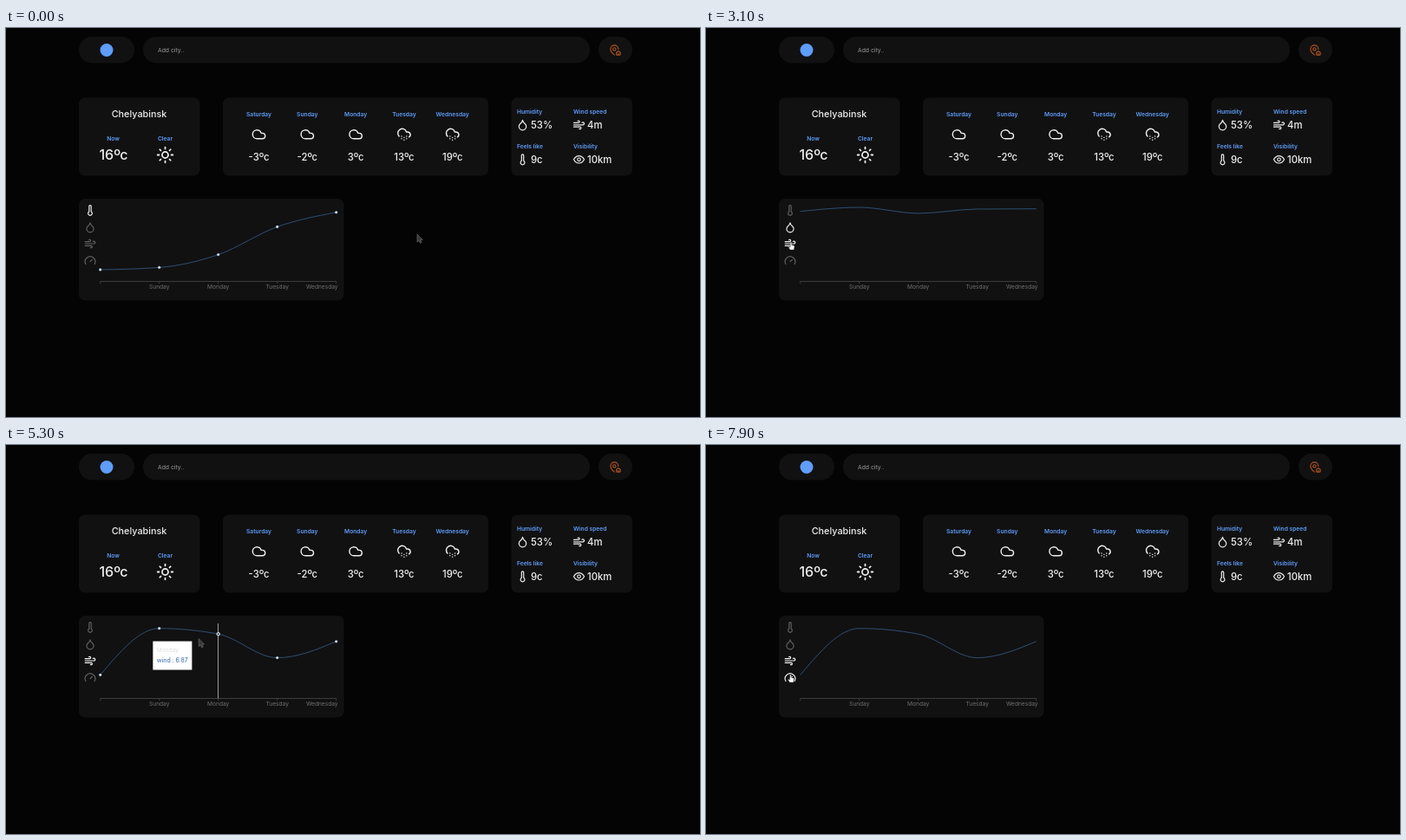
Animation, 800 px wide and 449 px high, one loop 8 s. Source, as an HTML page:

```html
<!DOCTYPE html>
<html lang="en">
<head>
<meta charset="utf-8">
<title>Weather dashboard</title>
<style>
  html, body { margin: 0; width: 100%; height: 100%; overflow: hidden; background: #040404; }
  svg { display: block; width: 800px; height: 449px; font-family: Inter, "Open Sans", sans-serif; }
  .card { fill: #111112; }
  .label { fill: #609df8; font-size: 6.7px; font-weight: 600; }
  .value { fill: #f0f0f0; font-size: 11.3px; font-weight: 500; }
  .mid { text-anchor: middle; }
  .icon { fill: none; stroke: #f0f0f0; stroke-width: 2; stroke-linecap: round; stroke-linejoin: round; }
  .axis { fill: none; stroke: #505050; stroke-width: .7; }
  .tick { fill: #707070; font-size: 6.6px; }
  .dot { fill: #fff; stroke: #5b9ad8; stroke-width: .3; }
</style>
</head>
<body>
<svg id="stage" viewBox="0 0 800 449">
  <g class="card">
    <rect x="84" y="10" width="64" height="30.5" rx="15"/>
    <rect x="158" y="10" width="515" height="30.5" rx="15"/>
    <rect x="683" y="10" width="39" height="30.5" rx="15"/>
    <rect x="84" y="80.5" width="139.5" height="90" rx="7"/>
    <rect x="250" y="80.5" width="306" height="90" rx="7"/>
    <rect x="582.5" y="80.5" width="139.5" height="90" rx="7"/>
    <rect x="84" y="197" width="305.5" height="117.5" rx="7"/>
  </g>
  <circle cx="116" cy="25.5" r="7.5" fill="#5f9df7"/>
  <text x="175" y="27.8" fill="#9a9a9a" font-size="6.8">Add city..</text>
  <g id="static"></g>
  <g id="tabs"></g>
  <path id="axis" class="axis"/>
  <g id="ticks"></g>
  <path id="curve" fill="none" stroke="#4378ae" stroke-width=".6"/>
  <g id="dots"></g>
  <g id="hover">
    <path id="rule" stroke="#9c9c9c" stroke-width="1"/>
    <circle id="active" r="1.7" fill="#27435f" stroke="#fff" stroke-width="1"/>
    <g id="tip">
      <rect width="45" height="33" fill="#fff"/>
      <text id="tipDay" x="4.5" y="12" font-size="6.6" fill="#dedede"></text>
      <text id="tipValue" x="4.5" y="24" font-size="6.9" font-weight="500" fill="#4b7db5"></text>
    </g>
  </g>
  <path id="arrow" d="M0 0V9L2 7.4 3.4 10.3 5 9.5 3.6 6.6H6.2Z" fill="#383838" stroke="#777" stroke-width=".6"/>
  <path id="hand" d="M-.8 .6Q0 -.6 .8 .6V3.4L3.3 4Q4.1 4.3 4 5.3L3.4 9H-1.2L-3 5.7Q-2.6 4.7 -.8 6Z" fill="#fff" stroke="#222" stroke-width=".4"/>
</svg>
<script>
const $ = id => document.getElementById(id);
const LOOP = 8000;
const DAYS = ["Saturday", "Sunday", "Monday", "Tuesday", "Wednesday"];
const LEFT = 108.7, STEP = 68;
const NODES = DAYS.map((_, i) => LEFT + i * STEP);
const TAB_Y = [210.5, 230, 249, 268.5];

const ICONS = {
  cloud: "M17.5 19H9a7 7 0 1 1 6.71-9h1.79a4.5 4.5 0 1 1 0 9Z",
  snow: "M4 14.9A7 7 0 1 1 15.71 8h1.79a4.5 4.5 0 0 1 2.5 8.24M8 15h.01M8 19h.01M12 17h.01M12 21h.01M16 15h.01M16 19h.01",
  sun: "M8 12a4 4 0 1 0 8 0a4 4 0 1 0-8 0M12 2v2M12 20v2M2 12h2M20 12h2M4.9 4.9l1.4 1.4M17.7 17.7l1.4 1.4M4.9 19.1l1.4-1.4M17.7 6.3l1.4-1.4",
  heat: "M14 4v10.54a4 4 0 1 1-4 0V4a2 2 0 0 1 4 0Z",
  drop: "M12 22a7 7 0 0 0 7-7c0-2-1-3.9-3-5.5s-3.5-4-4-6.5c-.5 2.5-2 4.9-4 6.5C6 11.1 5 13 5 15a7 7 0 0 0 7 7z",
  wind: "M9.6 4.6A2 2 0 1 1 11 8H2M12.6 19.4A2 2 0 1 0 14 16H2M17.7 7.7a2.5 2.5 0 1 1 1.8 4.3H2",
  gauge: "M12 14l4-4M3.34 19a10 10 0 1 1 17.32 0",
  eye: "M2 12s3.5-7 10-7 10 7 10 7-3.5 7-10 7-10-7-10-7ZM9 12a3 3 0 1 0 6 0a3 3 0 1 0-6 0",
  pin: "M10 22C7.5 20 2 15 2 10a8 8 0 0 1 16 0M7 10a3 3 0 1 0 6 0a3 3 0 1 0-6 0M15 22a1 1 0 0 1-1-1v-4l4-3 4 3v4a1 1 0 0 1-1 1zM18 22v-3"
};

const icon = (name, x, y, size = .6, style = "") =>
  `<path class="icon" d="${ICONS[name]}" transform="translate(${x} ${y}) scale(${size}) translate(-12 -12)" style="${style}"/>`;
const text = (cls, x, y, str, style = "") =>
  `<text class="${cls}" x="${x}" y="${y}" style="${style}">${str}</text>`;

function buildStatic() {
  const temps = [-3, -2, 3, 13, 19];
  const facts = [
    ["Humidity", "53%", "drop", 589, 99], ["Wind speed", "4m", "wind", 654, 99],
    ["Feels like", "9c", "heat", 589, 139], ["Visibility", "10km", "eye", 654, 139]
  ];
  let out = icon("pin", 702.5, 25.5, .56, "stroke:#b5561f")
    + text("value mid", 153.5, 102.5, "Chelyabinsk", "font-size:10.8px")
    + text("label mid", 123.5, 130, "Now")
    + text("label mid", 183.5, 130, "Clear")
    + text("value mid", 124, 151.8, "16ºc", "font-size:16px")
    + icon("sun", 183.5, 146.5, .88);
  DAYS.forEach((day, i) => {
    const x = 291.5 + i * 55.8;
    out += text("label mid", x, 101.7, day)
      + icon(i < 3 ? "cloud" : "snow", x, 122.8, .72)
      + text("value mid", x, 153, temps[i] + "ºc");
  });
  for (const [name, value, glyph, x, y] of facts)
    out += text("label", x, y, name) + icon(glyph, x + 6.5, y + 12.8)
      + text("value", x + 16, y + 16.7, value);
  $("static").innerHTML = out;

  $("tabs").innerHTML = ["heat", "drop", "wind", "gauge"]
    .map((name, i) => icon(name, 97, TAB_Y[i], .58)).join("");
  $("axis").setAttribute("d", `M${LEFT} 292.5H${NODES[4]}` + NODES.map(x => `M${x} 292.5v2.7`).join(""));
  $("ticks").innerHTML = DAYS.slice(1).map((day, i) =>
    text("tick", i < 3 ? NODES[i + 1] : 382.5, 300.5, day, `text-anchor:${i < 3 ? "middle" : "end"}`)).join("");
  $("dots").innerHTML = NODES.map(x => `<circle class="dot" cx="${x}" r="1.4"/>`).join("");
}

const SERIES = [
  { name: "temp", y: [279, 276.4, 261.6, 229.5, 212.8], value: y => Math.round((270 - y) / 3) },
  { name: "humidity", y: [211.7, 207, 213.9, 209, 208.7], value: y => Math.round(293 - y) },
  { name: "wind", y: [265.4, 211.7, 218.2, 245.6, 226.8], value: y => (2.51 + (265.4 - y) / 10.83).toFixed(2) }
];
// Clicks: start time, previous series, next series
const PHASES = [[-2000, 0, 0], [1600, 0, 1], [3200, 1, 2], [7850, 2, 2]];

// time, x, y
const POINTER = [
  [0, 474, 238], [300, 474, 238], [900, 101, 230], [1650, 98, 229], [2050, 99, 233],
  [2300, 101, 250], [3100, 98, 247], [3250, 98, 248], [3600, 95, 270], [3900, 98, 270],
  [4200, 116, 265], [4500, 115, 262.5], [4700, 117, 260], [5300, 222, 223.5],
  [5850, 366, 239], [6050, 366, 239], [6400, 274, 237], [7150, 112, 260],
  [7400, 98, 266], [7900, 97.5, 265]
];
const TIP = [
  [450, 331, 242], [900, 125, 234], [1000, 113, 233], [4000, 113, 209], [4600, 113, 209],
  [4900, 116, 216], [5300, 169, 226.5], [5500, 240, 231], [5650, 249, 234],
  [5950, 331, 243], [6120, 331, 243], [6300, 318, 241.5], [6440, 318, 241.5],
  [6650, 249, 244], [6850, 215, 246], [7050, 181, 240], [7250, 113, 222]
];

function follow(track, t) {
  const i = track.findIndex(k => k[0] > t);
  if (i === 0) return track[0].slice(1);
  if (i < 0) return track[track.length - 1].slice(1);
  const [t0, x0, y0] = track[i - 1], [t1, x1, y1] = track[i];
  const p = (t - t0) / (t1 - t0);
  return [x0 + (x1 - x0) * p, y0 + (y1 - y0) * p];
}

// cubic-bezier(.25, .1, .25, 1)
function ease(p) {
  if (p <= 0 || p >= 1) return p <= 0 ? 0 : 1;
  const bez = (a, b, u) => 3 * a * u * (1 - u) ** 2 + 3 * b * u * u * (1 - u) + u ** 3;
  let lo = 0, hi = 1;
  for (let i = 0; i < 20; i++) {
    const mid = (lo + hi) / 2;
    if (bez(.25, .25, mid) < p) lo = mid; else hi = mid;
  }
  return bez(.1, 1, lo);
}

// Monotone cubic through evenly spaced nodes
function curvePath(ys) {
  const n = ys.length - 1, third = STEP / 3;
  const s = ys.slice(1).map((y, i) => (y - ys[i]) / STEP);
  const m = ys.map((_, i) => {
    if (i === 0 || i === n) return 0;
    const a = s[i - 1], b = s[i];
    return (Math.sign(a) + Math.sign(b)) * Math.min(Math.abs(a), Math.abs(b), Math.abs(a + b) / 4);
  });
  m[0] = (3 * s[0] - m[1]) / 2;
  m[n] = (3 * s[n - 1] - m[n - 1]) / 2;
  let d = `M${NODES[0]} ${ys[0]}`;
  for (let i = 0; i < n; i++)
    d += `C${NODES[i] + third} ${ys[i] + m[i] * third} ${NODES[i + 1] - third} ${ys[i + 1] - m[i + 1] * third} ${NODES[i + 1]} ${ys[i + 1]}`;
  return d;
}

const show = (el, on) => { el.style.display = on ? "" : "none"; };
const move = (el, x, y) => el.setAttribute("transform", `translate(${x} ${y})`);

function draw(t) {
  const [start, from, to] = PHASES.filter(p => p[0] <= t).pop();
  const p = ease((t - start) / 1500);
  const series = SERIES[to];
  const ys = series.y.map((y, i) => SERIES[from].y[i] + (y - SERIES[from].y[i]) * p);
  $("curve").setAttribute("d", curvePath(ys));
  show($("dots"), t - start > 1560);
  [...$("dots").children].forEach((dot, i) => dot.setAttribute("cy", ys[i]));

  const [x, y] = follow(POINTER, t);
  const onTabs = x < 106;
  show($("arrow"), !onTabs);
  show($("hand"), onTabs);
  move($(onTabs ? "hand" : "arrow"), x, y);
  [...$("tabs").children].forEach((tab, i) => {
    const lit = i === to || (onTabs && Math.abs(y - TAB_Y[i]) < 9);
    tab.style.stroke = lit ? "#f4f4f4" : "#626262";
  });

  // The chart reacts slightly after the pointer
  const hx = follow(POINTER, Math.max(0, t - 40))[0];
  const inside = !onTabs && hx > 106 && hx < 382;
  show($("hover"), inside);
  if (!inside) return;
  const i = Math.max(0, Math.min(4, Math.round((hx - LEFT) / STEP)));
  $("rule").setAttribute("d", `M${Math.floor(NODES[i]) + .5} 206V292.5`);
  move($("active"), NODES[i], ys[i]);
  move($("tip"), ...follow(TIP, t));
  $("tipDay").textContent = DAYS[i];
  $("tipValue").textContent = `${series.name} : ${series.value(series.y[i])}`;
}

buildStatic();
const begin = performance.now();
function loop() {
  draw((performance.now() - begin) % LOOP);
  requestAnimationFrame(loop);
}
loop();
</script>
</body>
</html>
```
